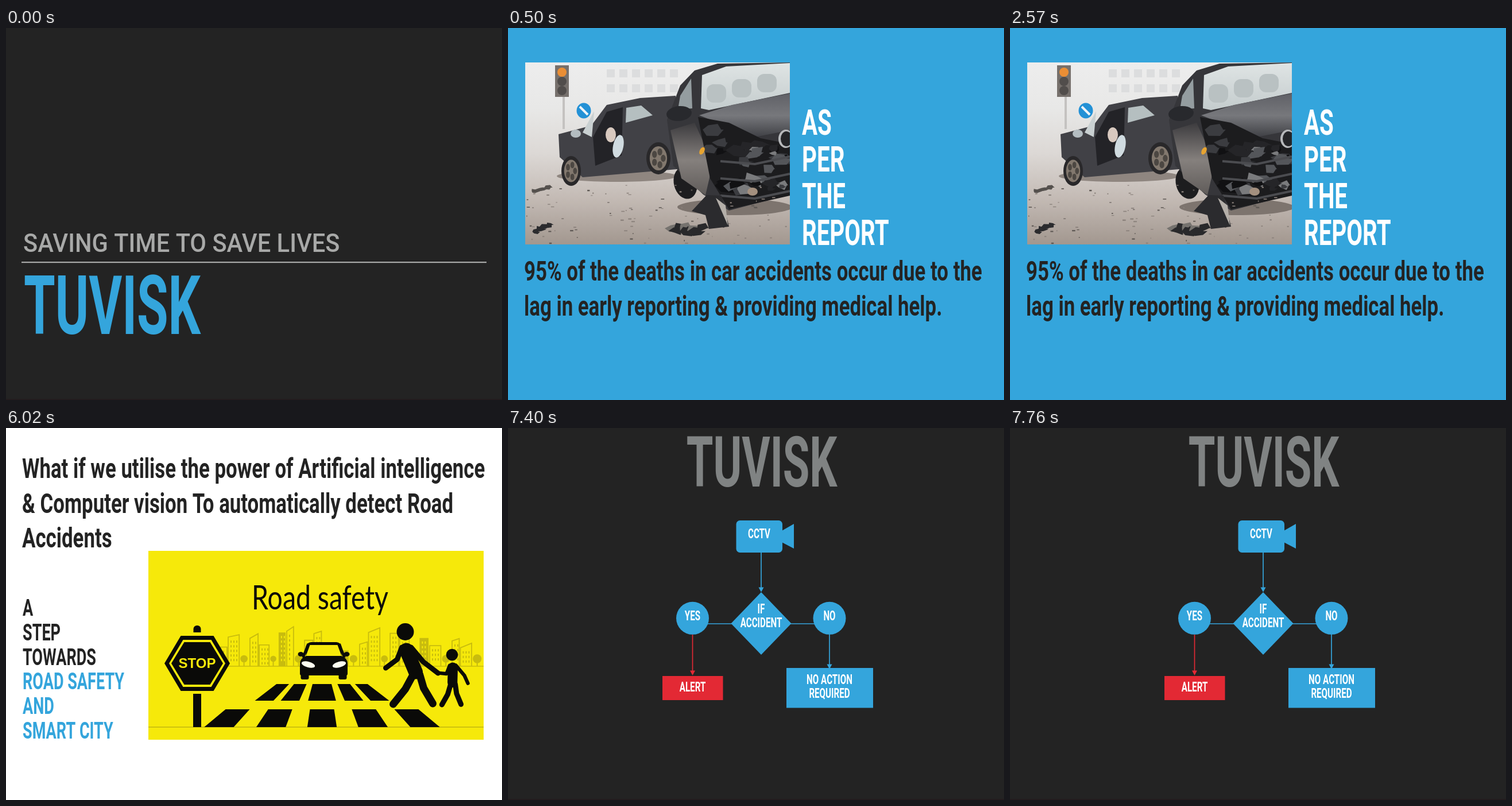
These frames come from a looping animation (864x648 px, 8 s). An HTML page with a canvas:

```html
<!DOCTYPE html>
<html lang="en">
<head>
<meta charset="utf-8">
<title>Road safety slides</title>
<style>
  html, body { margin: 0; width: 100%; height: 100%; overflow: hidden; background: #232323; }
  canvas { display: block; width: 864px; height: 648px; }
</style>
</head>
<body>
<canvas id="stage" width="864" height="648"></canvas>
<script>
const ctx = document.getElementById('stage').getContext('2d');
const W = 864, H = 648, LOOP = 8000, TAU = Math.PI * 2;
const DARK = '#232323', BLUE = '#34a5dc', RED = '#e32934', GREY = '#a8a9a8';
const YELLOW = '#f6e90a', OLIVE = '#c8bc0e', BLACK = '#0a0a08';
const NAME = 'TUVISK';

// Each face is a font with one fixed narrowing.
const FACES = {
  display: { font: 'Roboto, sans-serif', weight: 700, narrow: 0.62 },
  caps: { font: 'Roboto, sans-serif', weight: 700, narrow: 0.66 },
  body: { font: 'Roboto, sans-serif', weight: 700, narrow: 0.71 },
  wide: { font: 'Roboto, sans-serif', weight: 500, narrow: 0.925 },
  light: { font: 'Lato, sans-serif', weight: 400, narrow: 0.8 },
  sign: { font: '"Liberation Sans", Arial, sans-serif', weight: 700, narrow: 1 }
};

function text(str, x, y, size, face, color, align = 'left') {
  const { font, weight, narrow } = FACES[face];
  ctx.save();
  ctx.translate(x, y);
  ctx.scale(narrow, 1);
  ctx.font = `${weight} ${size}px ${font}`;
  ctx.textAlign = align;
  ctx.fillStyle = color;
  ctx.fillText(str, 0, 0);
  ctx.restore();
}

function lines(list, x, y, pitch, size, face, color, align) {
  list.forEach((str, i) => text(str, x, y + i * pitch, size, face, color, align));
}

function rect(x, y, w, h, color) {
  ctx.fillStyle = color;
  ctx.fillRect(x, y, w, h);
}

function trace(pts) {
  ctx.beginPath();
  for (let i = 0; i < pts.length; i += 2) ctx.lineTo(pts[i], pts[i + 1]);
}

function poly(color, ...pts) {
  trace(pts);
  ctx.fillStyle = color;
  ctx.fill();
}

function stroke(color, width, ...pts) {
  trace(pts);
  ctx.strokeStyle = color;
  ctx.lineWidth = width;
  ctx.stroke();
}

function oval(x, y, rx, ry, color, turn = 0) {
  ctx.beginPath();
  ctx.ellipse(x, y, rx, ry, turn, 0, TAU);
  ctx.fillStyle = color;
  ctx.fill();
}

function round(x, y, w, h, r, color) {
  ctx.beginPath();
  ctx.roundRect(x, y, w, h, r);
  ctx.fillStyle = color;
  ctx.fill();
}

function fade(y1, y2, ...colors) {
  const g = ctx.createLinearGradient(0, y1, 0, y2);
  colors.forEach((c, i) => g.addColorStop(i / (colors.length - 1), c));
  return g;
}

function inside(x, y, w, h, draw) {
  ctx.save();
  ctx.beginPath();
  ctx.rect(x, y, w, h);
  ctx.clip();
  draw();
  ctx.restore();
}

function seeded(seed) {
  return () => (seed = (seed * 16807) % 2147483647) / 2147483647;
}

function darkSlide() {
  rect(0, 0, W, H, DARK);
  rect(0, 646, W, 2, '#231c1e');
}

function titleSlide() {
  darkSlide();
  text('SAVING TIME TO SAVE LIVES', 30, 389.5, 45, 'wide', GREY);
  rect(27, 407, 810, 2.2, GREY);
  text(NAME, 31, 533, 143, 'display', BLUE);
}

function shard(rnd, x, y, r, color) {
  const pts = [];
  for (let a = 0; a < TAU; a += TAU / 6) {
    const d = r * (0.4 + rnd() * 0.8);
    pts.push(x + d * 1.3 * Math.cos(a), y + d * 0.8 * Math.sin(a));
  }
  poly(color, ...pts);
}

function street() {
  rect(30, 60, 461, 317, fade(60, 377, '#ededed', '#e8e8e7', '#dcd8d5', '#c3bab4', '#a2978f'));
  for (let i = 0; i < 12; i++) rect(172 + (i % 6) * 22, 72 + (i > 5) * 26, 14, 14, '#dcddde');
  rect(95, 118, 4, 58, '#c4c2c0');
  rect(82, 65, 24, 55, '#76706c');
  ['#ea8e35', '#514d4b', '#514d4b'].forEach((c, i) => oval(94, 77 + i * 16, 8, 8, c));
  oval(132, 144, 12.5, 13.5, '#2391d6');
  stroke('#eef4f8', 4, 125, 137, 139, 151);
}

function wheel(x, y, rx, ry) {
  oval(x, y, rx, ry, '#29282a');
  oval(x, y, rx * 0.72, ry * 0.75, '#82786e');
  for (let a = 0; a < TAU; a += TAU / 5) {
    oval(x + rx * 0.4 * Math.cos(a), y + ry * 0.42 * Math.sin(a), rx * 0.2, ry * 0.22, '#4c4742');
  }
}

function farCar() {
  oval(190, 258, 105, 10, '#8f8680');
  poly('#414146', 88, 185, 145, 170, 172, 134, 230, 122, 292, 118, 294, 246, 130, 260, 90, 225);
  poly('#b5bfc0', 206, 139, 232, 135, 252, 152, 205, 165);
  poly('#232327', 148, 190, 172, 146, 200, 138, 198, 222, 152, 240);
  poly('#c9d0d1', 130, 182, 150, 145, 146, 190);
  oval(179, 186, 9, 13, '#d8c9bf');
  oval(192, 206, 9, 20, '#d0dbe0', 0.2);
  oval(118, 184, 9, 7, '#b4bdc1');
  wheel(110, 249, 17, 26);
  wheel(262, 227, 21, 28);
}

function nearCar(rnd) {
  oval(395, 312, 100, 14, '#7d746e');
  oval(309, 270, 20, 28, '#1d1d1f', -0.25);
  poly('#36363a', 277, 160, 300, 100, 325, 74, 365, 62, 491, 60, 491, 290, 385, 318, 340, 290, 288, 240);
  poly(fade(165, 295, '#3c3b3e', '#85807d', '#5d5957'), 283, 178, 325, 165, 357, 235, 344, 291, 302, 262);
  poly('#949da0', 300, 118, 319, 88, 321, 140, 296, 142);
  poly(fade(62, 142, '#dfe4e4', '#c4cccd'), 338, 82, 380, 67, 491, 61, 491, 113, 350, 143, 336, 140);
  for (let i = 0; i < 3; i++) round(346 + i * 44, 98 - i * 9, 34, 32, 12, '#b9c1c2');
  poly(fade(115, 190, '#606167', '#77787c', '#3f4045'), 333, 152, 390, 134, 491, 114, 491, 178, 430, 190);
  oval(298, 149, 22, 13, '#28292d', -0.1);
  poly('#1c1c1e', 331, 155, 385, 165, 440, 192, 491, 202, 491, 292, 385, 316, 352, 262);

  // crumpled front: torn panels and bent trim
  const tones = ['#3b3c40', '#111113', '#54565a', '#252528', '#7a7b7d'];
  for (let i = 0; i < 34; i++) {
    const u = rnd();
    shard(rnd, 350 + u * 138, 168 + u * 40 + rnd() * (120 - u * 40), 5 + rnd() * 13, tones[i % 5]);
  }
  for (let i = 0; i < 3; i++) {
    const y = 228 + i * 30;
    stroke('#4b4c50', 4, 370, y + 4, 430, y + 9, 491, y - 4);
  }
  oval(426, 285, 9, 7, '#a4907f');
  oval(338, 214, 4, 7, '#e7a431', 0.5);
  oval(484, 193, 13, 16, '#b7b9bb');
  oval(485, 193, 10, 13, '#242528');
}

function debris(rnd) {
  for (let i = 0; i < 90; i++) {
    const y = 272 + rnd() * 103;
    rect(32 + rnd() * 455, y, 1 + rnd() * 5, 1 + rnd() * 1.5, i % 3 ? '#8c837d' : '#5f5955');
  }
  poly('#2b2b2e', 320, 319, 346, 291, 372, 292, 385, 346, 350, 350, 344, 326);
  poly('#b4afa9', 362, 296, 379, 309, 383, 344);
  for (let i = 0; i < 9; i++) shard(rnd, 288 + i * 6, 346 + rnd() * 8, 11, i % 3 ? '#29292b' : '#76736f');
  for (let i = 0; i < 4; i++) {
    shard(rnd, 48 + i * 8, 355 - i * 4, 8, '#2b2b2e');
    shard(rnd, 45 + i * 8, 284 - i * 2, 6, '#55514e');
  }
}

function reportSlide() {
  rect(0, 0, W, H, BLUE);
  inside(30, 60, 461, 317, () => {
    const rnd = seeded(71);
    street();
    farCar();
    nearCar(rnd);
    debris(rnd);
  });
  lines(['AS', 'PER', 'THE', 'REPORT'], 512, 185.5, 64, 61, 'caps', '#fff');
  lines(['95% of the deaths in car accidents occur due to the',
    'lag in early reporting & providing medical help.'], 28, 440, 61, 49, 'body', DARK);
}

function skyline() {
  const rnd = seeded(29), base = 415;
  stroke(OLIVE, 1.5, 366, base, 832, base);
  for (let i = 0, x = 374; x < 832; i++) {
    const w = 11 + rnd() * 9, top = 354 + rnd() * 34, solid = i % 5 === 4;
    if (solid) rect(x, top, w, base - top, OLIVE);
    else stroke(OLIVE, 1.8, x, base, x, top, x + w, top - (i % 3) * 4, x + w, base);
    for (let y = top + 6; y < base - 7; y += 8) {
      for (let c = x + 4; c < x + w - 3; c += 5) rect(c, y, 2, 4, solid ? YELLOW : OLIVE);
    }
    x += w + 2;
    if (i % 2) {
      const r = 5 + rnd() * 3;
      rect(x + r - 1, base - 12, 2, 12, OLIVE);
      oval(x + r, base - 13, r, r, OLIVE);
      x += r * 2 + 4;
    }
  }
}

function hexagon(rx, ry, color) {
  const x = 333, y = 410, s = rx / 2;
  poly(color, x - rx, y, x - s, y - ry, x + s, y - ry, x + rx, y, x + s, y + ry, x - s, y + ry);
}

function stopSign() {
  round(326.5, 344, 13, 12, [6, 6, 0, 0], BLACK);
  rect(326, 463, 14, 58, BLACK);
  hexagon(57, 48, BLACK);
  hexagon(49, 41, YELLOW);
  hexagon(45, 37, BLACK);
  text('STOP', 333, 417.5, 24, 'sign', YELLOW, 'center');
}

function frontCar() {
  const x = 553.5;
  round(x - 31, 373, 62, 40, [9, 9, 0, 0], BLACK);
  round(x - 41.5, 397, 83, 34, [14, 14, 3, 3], BLACK);
  poly(YELLOW, x - 24, 378, x + 24, 378, x + 31, 397, x - 31, 397);
  for (const s of [-1, 1]) {
    stroke(BLACK, 4.5, x + s * 27, 376, x + s * 36, 400);
    oval(x + s * 40, 394, 5, 4, BLACK);
    round(x + s * 33 - 7, 420, 14, 18, 3, BLACK);
    oval(x + s * 27, 412, 12, 5, '#fffef0', s * -0.25);
  }
}

// Bars fan out from a point above the road; slopes are offset per pixel of depth.
function crossing(y1, y2, eye, half, first, pitch, width) {
  const x = 550.5, d1 = y1 - eye, d2 = y2 - eye;
  const bar = (a, b) => poly(BLACK, x + a * d1, y1, x + b * d1, y1, x + b * d2, y2, x + a * d2, y2);
  bar(-half, half);
  for (const s of [-1, 1]) {
    for (let i = 0; i < 2; i++) bar(s * (first + i * pitch), s * (first + i * pitch + width));
  }
}

function walker(x, y, size, lean, stride, reach) {
  ctx.save();
  ctx.translate(x, y);
  ctx.scale(size, size);
  ctx.lineCap = ctx.lineJoin = 'round';
  oval(0, 0, 15, 15, BLACK);
  stroke(BLACK, 25, 2, 32, lean - 2, 70);
  stroke(BLACK, 9, -6, 27, -14, 48, -34, reach);
  stroke(BLACK, 9, 10, 27, 31, 52, 37 + lean, 72);
  stroke(BLACK, 13, lean - 7, 76, lean - 20 * stride, 100, lean - 41 * stride, 126);
  stroke(BLACK, 13, lean + 5, 74, lean + 12 * stride, 98, lean + 28 * stride, 125);
  ctx.restore();
}

function safetySlide() {
  rect(0, 0, W, H, '#fff');
  lines(['What if we utilise the power of Artificial intelligence',
    '& Computer vision To automatically detect Road', 'Accidents'], 28, 87, 60.7, 49, 'body', DARK);
  lines(['A', 'STEP', 'TOWARDS'], 29, 327, 42.8, 41, 'caps', DARK);
  lines(['ROAD SAFETY', 'AND', 'SMART CITY'], 29, 455.4, 42.8, 41, 'caps', BLUE);
  inside(248, 214, 584, 329, () => {
    rect(248, 214, 584, 329, YELLOW);
    text('Road safety', 547, 316, 58, 'light', BLACK, 'center');
    skyline();
    rect(248, 520.5, 584, 1, '#a89e12');
    stopSign();
    crossing(446, 475, 385, 0.27, 0.44, 0.5, 0.36);
    crossing(490, 521, 350, 0.15, 0.37, 0.53, 0.3);
    frontCar();
    walker(695.5, 355, 1, 20, 1, 63);
    walker(777, 395, 0.69, 3, 0.7, 46);
  });
}

function arrow(x, y1, tip, color) {
  stroke(color, 1.7, x, y1, x, tip - 8);
  poly(color, x - 4.5, tip - 8.5, x + 4.5, tip - 8.5, x, tip);
}

function flowSlide() {
  darkSlide();
  text(NAME, 442, 102, 122, 'display', '#808383', 'center');

  const x = 441, left = 321.5, right = 560, r = 28.5;
  arrow(x, 216, 286, BLUE);
  arrow(left, 360, 431, RED);
  arrow(right, 358, 420, BLUE);
  stroke(BLUE, 1.7, left, 341, right, 341);
  poly(BLUE, x, 286, x + 52.5, 340.5, x, 395, x - 52.5, 340.5);
  oval(left, 331.3, r, r, BLUE);
  oval(right, 331.3, r, r, BLUE);
  round(397.5, 161, 80.5, 56, 6.5, BLUE);
  poly(BLUE, 477, 179, 498, 167, 498, 210, 477, 199);
  rect(269, 432, 105.5, 42, RED);
  rect(485, 418, 151, 69.5, BLUE);

  const label = (cx, y, ...rows) => lines(rows, cx, y, 24, 23, 'caps', '#fff', 'center');
  label(437.5, 192, 'CCTV');
  label(x, 322.5, 'IF', 'ACCIDENT');
  label(left, 334.5, 'YES');
  label(right, 334.5, 'NO');
  label(left, 458.5, 'ALERT');
  label(right, 445.5, 'NO ACTION', 'REQUIRED');
}

const SLIDES = [[0, titleSlide], [500, reportSlide], [3950, safetySlide], [7400, flowSlide]];
const start = performance.now();
let shown = null;

function tick() {
  const t = (performance.now() - start) % LOOP;
  const draw = SLIDES.filter(([at]) => t >= at).pop()[1];
  if (draw !== shown) {
    shown = draw;
    draw();
  }
  requestAnimationFrame(tick);
}
tick();
</script>
</body>
</html>
```
